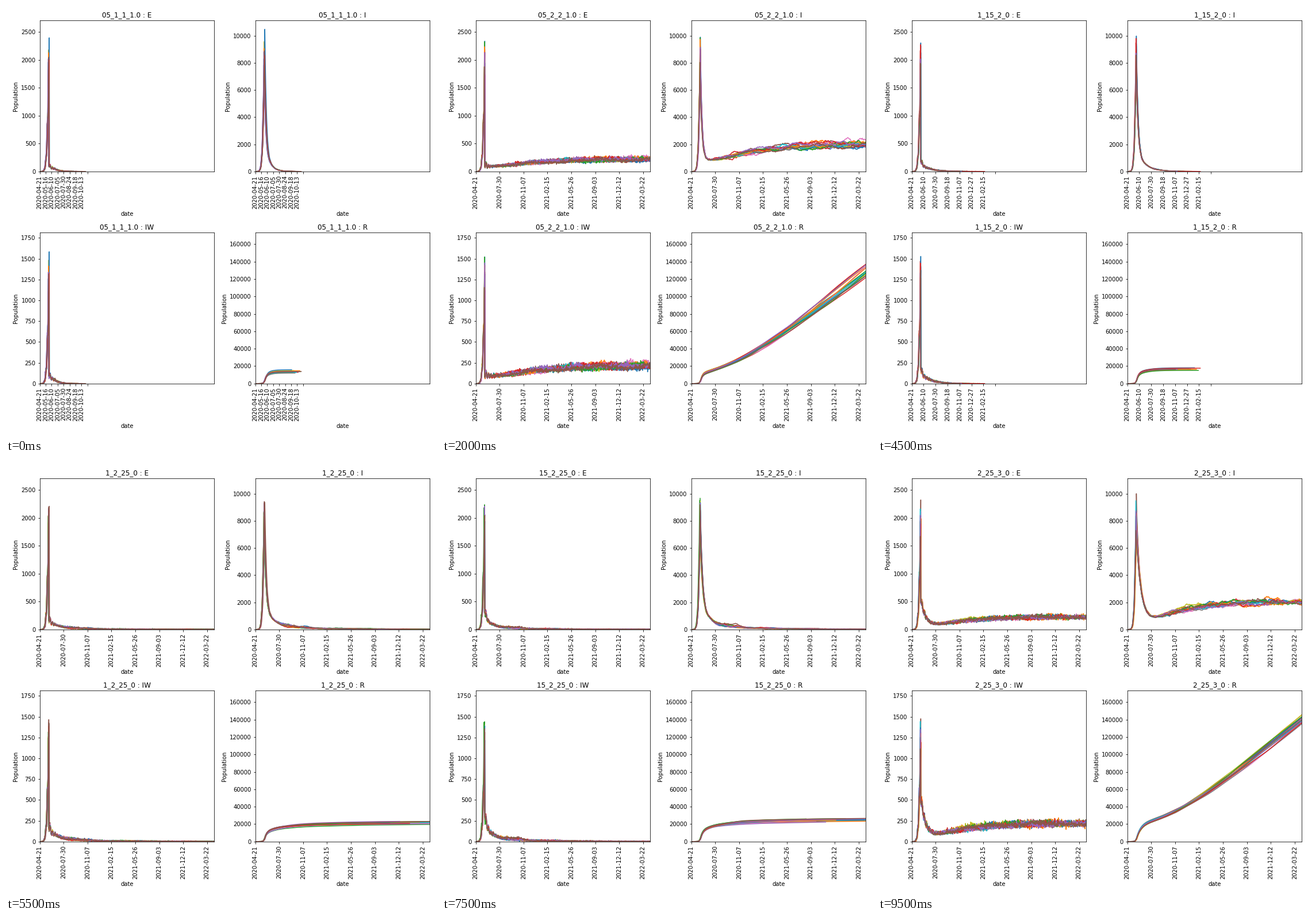
These frames come from a looping animation (748x748 px, 10000 ms). A matplotlib script:

```python
import numpy as np
import matplotlib.pyplot as plt
from matplotlib.animation import FuncAnimation

SIZE, DPI = 748, 72
HORIZON, RUNS = 730, 16
REMOVAL, INFLOW, RECOVERY = 0.14, 1.27, 0.108
REOPEN_BELOW, LOCK_ABOVE = 950, 3120
DAYS = np.arange(HORIZON + 1)
START = np.datetime64("2020-04-21")

SCENARIOS = """05_1_1_1.0 05_1_15_0 05_15_15_1.0 05_15_2_0 05_2_2_1.0
05_2_25_0 05_25_25_1.0 05_25_3_0 1_15_15_1.0 1_15_2_0
1_2_2_1.0 1_2_25_0 1_25_25_1.0 1_25_3_0 15_2_2_1.0
15_2_25_0 15_25_25_1.0 15_25_3_0 2_25_25_1.0 2_25_3_0""".split()

# lockdown rate: exposed after the peak, decay time, reopening day, later decline
LOCKDOWN = {0.5: (130, 8, 62, 0.027), 1.0: (220, 9, 68, 0.022),
            1.5: (380, 11, 75, 0.016), 2.0: (580, 17, 93, 0.009)}

# (open rate, full tracing): exposed at reopening, decay rate, first and last end day
FADING = {(0.5, False): (45, 0.06, 150, 188), (1.0, True): (45, 0.05, 150, 192),
          (1.0, False): (58, 0.026, 185, 305), (1.5, True): (80, 0.013, 250, 445)}

# panel: left, top, right, bottom in pixels, and the y limit
PANELS = {"E": (58.6, 25.4, 362.2, 287.8, 2707), "I": (433.6, 25.4, 737.4, 287.8, 11128),
          "IW": (58.6, 394.4, 362.2, 656.8, 1812), "R": (433.6, 394.4, 737.4, 656.8, 173200)}


def parse(name):
    lock, rate, _, tracing = name.split("_")
    number = lambda s: float(s) / 10 if len(s) == 2 else float(s)
    full = tracing == "1.0"
    return number(lock), number(rate) - (0 if full else 0.5), full


def wander(rng, step):
    """Slow mean-reverting drift for every run."""
    noise = rng.normal(0, step, (RUNS, HORIZON + 1))
    drift = np.zeros_like(noise)
    for t in range(1, HORIZON + 1):
        drift[:, t] = 0.985 * drift[:, t - 1] + noise[:, t]
    return drift


def reopened_level(rate, full, reopen):
    """Mean exposed count after reopening."""
    since = np.maximum(DAYS - reopen, 0)
    if (rate, full) in FADING:
        level, decay = FADING[rate, full][:2]
        return level * np.exp(-decay * since)
    if rate == 1.5:
        return 80 * (reopen / np.maximum(DAYS, reopen)) ** 1.5
    tau = 230 if full else 180
    return 225 - 135 * np.exp(-(since / tau) ** 1.3)


def exposed_mean(rng, lock, rate, full):
    start, tau, reopen, _ = LOCKDOWN[lock]
    peak_day = rng.normal(37.8, 1.0, (RUNS, 1))
    peak = rng.normal(2220, 125, (RUNS, 1))
    before = np.maximum(peak_day - DAYS, 0)
    after = np.maximum(DAYS - peak_day, 0)
    growth = peak / 1.15 * np.exp(-0.125 * before - 0.0045 * before ** 2)
    growth *= 1 + 0.15 * np.cos(2 * np.pi * before / 6.5)

    level = reopened_level(rate, full, reopen)
    drift = wander(rng, 0.045 if rate == 1.5 else 0.012)
    drift *= np.clip((DAYS - reopen) / 60, 0, 1)
    echo = 1 + 0.6 * np.exp(-after / 15) * np.cos(2 * np.pi * (DAYS - 54) / 10)
    locked = level * echo * np.exp(drift) + (start - level[0]) * np.exp(-after / tau)
    rising = DAYS <= peak_day
    return np.where(rising, growth, locked), rising


def simulate(index):
    rng = np.random.default_rng(100 + index)
    lock, rate, full = parse(SCENARIOS[index])
    fall = LOCKDOWN[lock][3]

    mean, rising = exposed_mean(rng, lock, rate, full)
    exposed = rng.poisson(mean).astype(float)
    infected = np.zeros_like(mean)
    up = 0.0218 * rng.normal(1, 0.035, RUNS)
    down = fall * rng.normal(1, 0.035, RUNS)
    cycling = np.zeros(RUNS, bool)
    is_open = np.zeros(RUNS, bool)
    for t in range(1, HORIZON + 1):
        previous = infected[:, t - 1]
        infected[:, t] = previous * (1 - REMOVAL) + INFLOW * exposed[:, t]
        if rate == 2.5 and t > 45:
            # reopen below the low threshold, lock down above the high one
            is_open = (is_open | (previous < REOPEN_BELOW)) & (previous < LOCK_ABOVE)
            cycling |= previous < REOPEN_BELOW
            slope = np.where(is_open, up, -down)
            level = previous * np.exp(slope + rng.normal(0, 0.006, RUNS))
            infected[:, t] = np.where(cycling, level, infected[:, t])
            mean[:, t] = np.where(cycling, level * (REMOVAL + slope) / INFLOW, mean[:, t])
            exposed[:, t] = np.where(cycling, rng.poisson(mean[:, t]), exposed[:, t])

    waiting = rng.poisson(mean * np.where(rising, 0.65, 0.97)).astype(float)
    recovered = np.zeros_like(infected)
    recovered[:, 4:] = RECOVERY * np.cumsum(infected, axis=1)[:, :-4]

    ends, last = np.full(RUNS, HORIZON), HORIZON
    if (rate, full) in FADING:
        first, last = FADING[rate, full][2:]
        if rate == 1.5 and lock == 1.0:
            first, last = 300, 545
        ends = rng.permutation(np.linspace(first, last, RUNS))
    elif rate == 1.5:
        ends = rng.permutation(np.linspace(480, 1100, RUNS))
    result = {"E": exposed, "I": infected, "IW": waiting, "R": recovered}
    for values in result.values():
        values[DAYS > ends[:, None]] = np.nan
    return result, last


def date_ticks(last):
    step = 25 if last < 200 else 50 if last < 350 else 100
    stop = HORIZON if last == HORIZON else -(-last // step) * step
    ticks = np.arange(0, stop + 1, step)
    labels = [str(START + np.timedelta64(int(t), "D")) for t in ticks]
    if last < HORIZON:
        labels[-1] = ""
    return ticks, labels


plt.rcParams.update({"font.family": "DejaVu Sans", "font.size": 10})
fig = plt.figure(figsize=(SIZE / DPI, SIZE / DPI), dpi=DPI, facecolor="white")
axes = {key: fig.add_axes([x0 / SIZE, 1 - y1 / SIZE, (x1 - x0) / SIZE, (y1 - y0) / SIZE])
        for key, (x0, y0, x1, y1, _) in PANELS.items()}
results = [simulate(i) for i in range(len(SCENARIOS))]


def draw(index):
    series, last = results[index]
    ticks, labels = date_ticks(last)
    for key, ax in axes.items():
        ax.clear()
        for values in series[key]:
            ax.plot(DAYS, values, lw=1.5)
        ax.set_xlim(0, HORIZON)
        ax.set_ylim(0, PANELS[key][4])
        ax.set_xticks(ticks, labels, rotation=90)
        ax.set_xlabel("date")
        ax.set_ylabel("Population")
        ax.set_title(f"{SCENARIOS[index]} : {key}")
    return []


anim = FuncAnimation(fig, draw, frames=len(SCENARIOS), interval=500,
                     init_func=lambda: [], repeat=True, repeat_delay=0)
plt.show()
```
